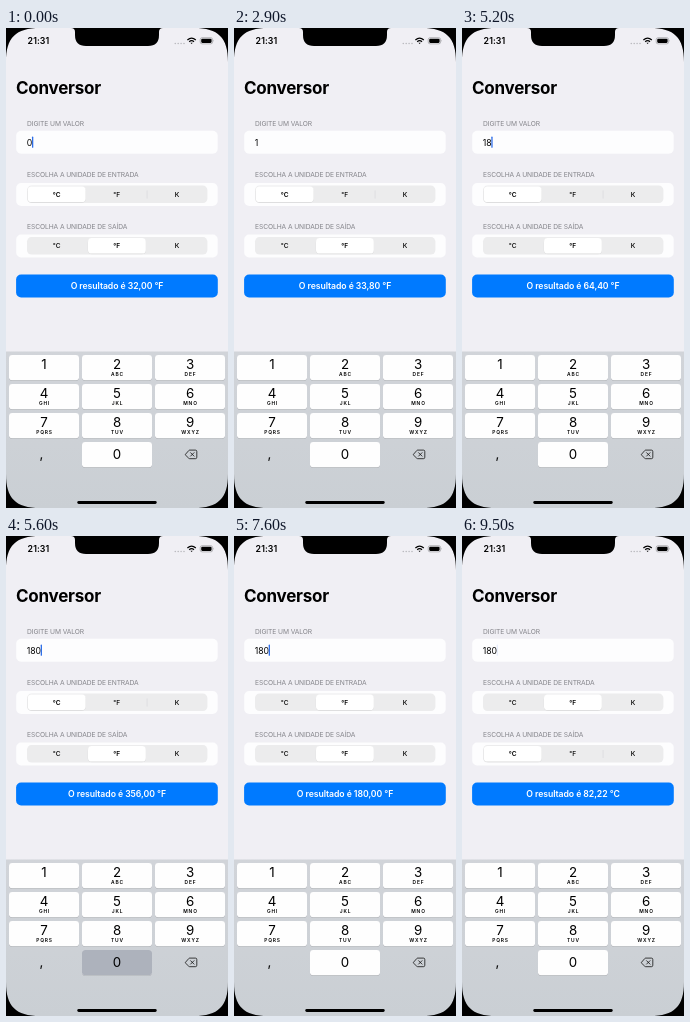
An HTML page that plays this animation: 222 by 480 pixels, repeating every 9600 ms.

```html
<!DOCTYPE html>
<html lang="pt">
<head>
<meta charset="utf-8">
<title>Conversor</title>
<style>
  html, body { margin: 0; width: 100%; height: 100%; overflow: hidden; background: #f0eff4; }
  svg { display: block; width: 222px; height: 480px; font-family: Inter, Roboto, sans-serif; }
  .title { font-size: 17px; font-weight: 700; letter-spacing: -.014em; }
  .clock { font-size: 8.8px; font-weight: 600; letter-spacing: .08px; }
  .label { font-size: 6.7px; letter-spacing: -.085px; fill: #85858b; }
  .input { font-size: 8.7px; letter-spacing: -.1px; }
  .result { font-size: 8.7px; font-weight: 600; letter-spacing: -.07px; fill: #fff; }
  .seg { font-size: 6.6px; font-weight: 500; }
  .digit { font-size: 13.3px; }
  .letters { font-size: 4.9px; font-weight: 600; letter-spacing: .85px; }
  .mid { text-anchor: middle; }
  .row { fill: #fdfdfe; }
</style>
</head>
<body>
<svg id="stage" viewBox="0 0 222 480">
  <defs>
    <linearGradient id="board" x2="0" y2="1">
      <stop stop-color="#d1d4d9"/><stop offset="1" stop-color="#cacfd4"/>
    </linearGradient>
  </defs>
  <rect width="222" height="480" fill="#f0eff4"/>
  <text class="title" x="10" y="66.3">Conversor</text>

  <text class="label" x="21" y="97.7">DIGITE UM VALOR</text>
  <rect class="row" x="10.2" y="102.8" width="201.5" height="23" rx="5"/>
  <text class="input" id="input" x="20.8" y="117.6"></text>
  <rect id="caret" y="108.6" width="1.3" height="11.2" rx=".6" fill="#2f6fe8"/>

  <text class="label" x="21" y="149.1">ESCOLHA A UNIDADE DE ENTRADA</text>
  <g id="from"></g>
  <text class="label" x="21" y="200.6">ESCOLHA A UNIDADE DE SAÍDA</text>
  <g id="to"></g>

  <rect x="10.1" y="246.5" width="201.7" height="23" rx="5" fill="#007aff"/>
  <text class="result mid" id="result" x="111" y="261.4"></text>

  <rect y="323.5" width="222" height="156.5" fill="url(#board)"/>
  <g id="keys"></g>
  <text class="digit mid" x="35.5" y="430.6">,</text>
  <g stroke="#111" stroke-width=".8" stroke-linejoin="round" stroke-linecap="round">
    <path id="erase" d="M179.4 426.4l3.4-3.9q.4-.4 1-.4h5.6q1.4 0 1.4 1.4v5.8q0 1.4-1.4 1.4h-5.6q-.6 0-1-.4z" fill="#111" fill-opacity="0"/>
    <path id="cross" d="M184.6 424.7l3.4 3.4m0-3.4l-3.4 3.4"/>
  </g>
  <rect x="71.3" y="473" width="79.4" height="2.9" rx="1.4"/>

  <text class="clock" x="21.6" y="16.2">21:31</text>
  <g fill="#b9b9be">
    <circle cx="169.3" cy="15.5" r=".8"/><circle cx="172.2" cy="15.5" r=".8"/>
    <circle cx="175.1" cy="15.5" r=".8"/><circle cx="178" cy="15.5" r=".8"/>
  </g>
  <g fill="none" stroke="#000" stroke-width="1.3">
    <path d="M181.4 11.9q4.2-3.5 8.4 0M183.2 13.7q2.4-2 4.8 0"/>
    <path d="M184.5 14.8h2.2l-1.1 1.3z" fill="#000" stroke="none"/>
  </g>
  <rect x="194.2" y="9.7" width="12.4" height="6.2" rx="1.9" fill="none" stroke="#8d8d91" stroke-width=".6"/>
  <rect x="195.2" y="10.7" width="10.4" height="4.2" rx="1.1"/>
  <path d="M207.4 11.8q1 1 0 2z" fill="#8d8d91"/>

  <path fill-rule="evenodd" d="M0 0H222V480H0zM34 0C9.7 0 0 9.7 0 34V446C0 470.3 9.7 480 34 480H188C212.3 480 222 470.3 222 446V34C222 9.7 212.3 0 188 0z"/>
  <path d="M65 0q4 0 4 4v3q0 11 11 11h62q11 0 11-11v-3q0-4 4-4z"/>
</svg>
<script>
const LOOP = 9600, STEP = 100;
const $ = id => document.getElementById(id);
const clamp = v => Math.max(0, Math.min(1, v));

function add(parent, tag, attrs, text = '') {
  const el = document.createElementNS('http://www.w3.org/2000/svg', tag);
  for (const k in attrs) el.setAttribute(k, attrs[k]);
  el.textContent = text;
  parent.append(el);
  return el;
}

function segments(group, y) {
  add(group, 'rect', { class: 'row', x: 10.2, y, width: 201.5, height: 23, rx: 5 });
  add(group, 'rect', { x: 21, y: y + 2.6, width: 180.4, height: 17.4, rx: 4.5, fill: '#ececed' });
  const line = add(group, 'rect', { x: 140.8, y: y + 7.5, width: .5, height: 8, fill: '#d2d2d6' });
  const thumb = add(group, 'g', {});
  add(thumb, 'rect', { x: 21.6, y: y + 4, width: 58.2, height: 15.8, rx: 4, fill: '#000', opacity: .08 });
  add(thumb, 'rect', { x: 21.8, y: y + 3.5, width: 57.8, height: 15.6, rx: 3.7, fill: '#fff' });
  const labels = ['°C', '°F', 'K'].map((s, i) =>
    add(group, 'text', { class: 'seg mid', x: 50.7 + 60.1 * i, y: y + 13.8 }, s));
  return (pos, touched) => {
    thumb.setAttribute('transform', `translate(${60.2 * pos})`);
    line.setAttribute('opacity', 1 - pos);
    labels.forEach((el, i) => {
      el.style.fontWeight = Math.round(pos) === i ? 600 : 500;
      el.setAttribute('opacity', touched === i ? .4 : 1);
    });
  };
}

const keys = {};
[...'1234567890'].forEach((d, i) => {
  const col = d === '0' ? 1 : i % 3, row = Math.floor(i / 3);
  const x = 3 + 73 * col, y = 327 + 29 * row, cx = x + 35;
  const letters = ['', 'ABC', 'DEF', 'GHI', 'JKL', 'MNO', 'PQRS', 'TUV', 'WXYZ', ''][i];
  const box = { x, width: 70, height: 25.2, rx: 3 };
  add($('keys'), 'rect', { ...box, y: y + .6, fill: '#a3a6ab' });
  add($('keys'), 'rect', { ...box, y, fill: '#fefefe' });
  keys[d] = add($('keys'), 'rect', { ...box, y, fill: '#adb2bc', opacity: 0 });
  add($('keys'), 'text', { class: 'digit mid', x: cx, y: y + (d === '0' ? 17.4 : 13.8) }, d);
  add($('keys'), 'text', { class: 'letters mid', x: cx + .5, y: y + 21.2 }, letters);
});

const setFrom = segments($('from'), 155), setTo = segments($('to'), 206.5);

// start time and value
const typed = [[0, '0'], [1300, ''], [2200, '1'], [3200, '18'], [5600, '180']];
const results = [[0, '32,00 °F'], [2200, '33,80 °F'], [3200, '64,40 °F'],
  [5600, '356,00 °F'], [6800, '180,00 °F'], [7900, '82,22 °C']];
const presses = { 1: 2100, 8: 3100, 0: 5500 };
// caret fade-out and fade-in starts
const blinks = [[120, 500], [1690, 2000], [2680, 3000], [3640, 4000], [4680, 5000],
  [6030, 6400], [7080, 7400], [8080, 8400], [9030, 9480]];

const at = (list, t) => list.filter(e => e[0] <= t).pop()[1];
const glow = (t, start) => t < start ? 0 : clamp(2 - (t - start) / 100);
const slide = (t, start) => 1 - (1 - clamp((t - start) / 300)) ** 2;

function caretAlpha(t) {
  const b = blinks.find(([out, back]) => t >= out && t < back + 200);
  return b ? clamp(Math.max(1 - (t - b[0]) / 220, (t - b[1]) / 200)) : 1;
}

function draw(t) {
  const value = at(typed, t), input = $('input');
  input.textContent = value || 'Quantidade';
  input.setAttribute('fill', value ? '#000' : '#c4c4c7');
  $('caret').setAttribute('x', 20.6 + (value ? input.getComputedTextLength() : 0));
  $('caret').setAttribute('opacity', caretAlpha(t));
  $('result').textContent = 'O resultado é ' + at(results, t);

  for (const d in presses) keys[d].setAttribute('opacity', glow(t, presses[d]));
  const erase = glow(t, 1200);
  $('erase').setAttribute('fill-opacity', erase);
  $('cross').setAttribute('stroke', erase > .4 ? '#fff' : '#111');

  setFrom(slide(t, 6700), t === 6700 ? 1 : -1);
  setTo(1 - slide(t, 7800), t === 7800 ? 0 : -1);
}

const origin = performance.now();
let last = -1;
function tick() {
  const t = Math.floor((performance.now() - origin) % LOOP / STEP) * STEP;
  if (t !== last) draw(last = t);
  requestAnimationFrame(tick);
}
tick();
</script>
</body>
</html>
```
